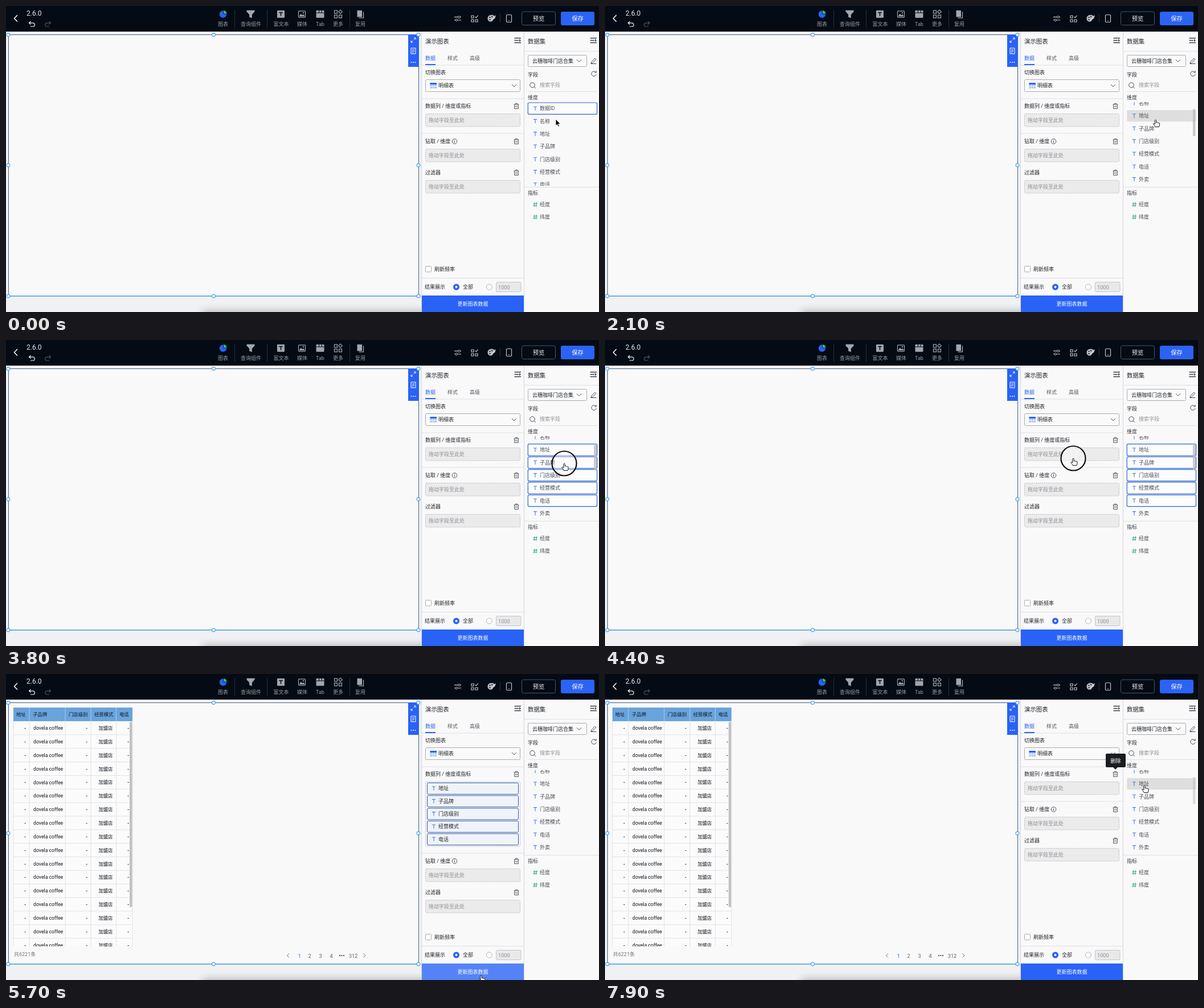
An HTML page that plays this animation: 1041 by 538 pixels, repeating every 8000 ms.

```html
<!DOCTYPE html>
<html lang="zh-CN">
<head>
<meta charset="utf-8">
<title>明细表</title>
<style>
html, body { margin: 0; width: 100%; height: 100%; overflow: hidden; background: #f8f9f9; }
svg { display: block; width: 100%; height: 100%; }
text { font-family: Roboto, "Noto Sans CJK SC", "Noto Sans CJK", sans-serif; white-space: pre; }
</style>
</head>
<body>
<svg id="stage" viewBox="0 0 1041 538"></svg>
<script>
const BLUE = '#2962f6', INK = '#23262b', GREY = '#9a9da3', MUTED = '#8f9296';
const PITCH = 22.33, SCROLL = 31.7, LOOP = 8000;
const fields = ['数据ID', '名称', '地址', '子品牌', '门店级别', '经营模式', '电话', '外卖'];

// Drawing helpers; text is placed by its vertical centre
const text = (x, cy, s, { size = 9, fill = INK, weight = 400, anchor = 'start' } = {}) =>
  `<text x="${x}" y="${cy + size * 0.36}" font-size="${size}" fill="${fill}" font-weight="${weight}" text-anchor="${anchor}">${s}</text>`;
const box = (x1, y1, x2, y2, fill = 'none', extra = '') =>
  `<rect x="${x1}" y="${y1}" width="${x2 - x1}" height="${y2 - y1}" fill="${fill}" ${extra}/>`;
const line = (d, stroke, width = 1, extra = '') =>
  `<path d="${d}" fill="none" stroke="${stroke}" stroke-width="${width}" ${extra}/>`;
const dot = (x, y, r, fill, extra = '') => `<circle cx="${x}" cy="${y}" r="${r}" fill="${fill}" ${extra}/>`;
const group = (body, attrs = '') => `<g ${attrs}>${body}</g>`;
const at = (x, y, body) => group(body, `transform="translate(${x} ${y})"`);
const round = 'stroke-linecap="round" stroke-linejoin="round"';

const rule = (y, x1, x2) => line(`M${x1} ${y}H${x2}`, '#dfe0e2');
const chevron = (x, y) => line(`M${x - 4} ${y - 2}l4 4 4-4`, '#4b4e54');
const typeIcon = (x, y) => line(`M${x - 3} ${y - 3}h6M${x} ${y - 3}v6.8`, '#4a7be8', 1.1);
const hashIcon = (x, y) => line(`M${x - 1} ${y - 4}l-1 8M${x + 2.4} ${y - 4}l-1 8M${x - 3.5} ${y - 1.6}h7.6M${x - 4} ${y + 1.8}h7.6`, '#2fab8e');
const trash = (y) => at(896, y, line('M-4.5 -3h9M-1.7 -3v-1.7h3.4V-3M-3.4 -3v7.5h6.8V-3M-1.2 -.8v3.2M1.2 -.8v3.2', '#565960'));
const menuIcon = (x) => at(x, 60.5, line('M-5.5 -4h11.5M-5.5 0h7.5M-5.5 4h11.5', '#3c3f45', 1.3) + '<path d="M3 -2.5l3 2.5-3 2.5z" fill="#3c3f45"/>');
const dropZone = (y) =>
  box(736.5, y + .5, 902.5, y + 23, '#ebebec', 'stroke="#b9babd" stroke-dasharray="2 1.5" rx="2"') +
  text(742, y + 12, '拖动字段至此处', { fill: '#8b8e93' });

function header() {
  const label = (x, s) => text(x, 31.5, s, { fill: GREY, anchor: 'middle' });
  const icons = [
    at(381, 14.5, dot(0, 0, 6.2, BLUE) + '<path d="M.6 -.6V-7A6.4 6.4 0 0 1 7 -.6z" fill="#28c08c" stroke="#040b14" stroke-width=".8"/>'),
    at(429.5, 14, '<path d="M-7 -6.5H7V-4L2.4 1V7L-2.4 5.5V1L-7 -4z" fill="#a3a6ab"/>'),
    at(482.5, 14.3, box(-6.5, -6.5, 6.5, 6.5, '#a3a6ab', 'rx="1"') + line('M-3.3 -2.8h6.6M0 -2.8v6', '#040b14', 1.6)),
    at(519.5, 14.3, box(-6, -5.5, 6, 5.5, 'none', 'stroke="#a3a6ab" stroke-width="1.2" rx="1"') + '<path d="M-5 4L-2 -.5 1 2 3 .2 5 4z" fill="#a3a6ab"/>' + dot(2.5, -2.4, 1.2, '#a3a6ab')),
    at(551.5, 14.3, box(-7, -6.5, 7, 6.5, '#a3a6ab', 'rx="1"') + line('M-7 -2.3H7M-2 -6.5v4M2.6 -6.5v4', '#040b14', 1.1)),
    at(583, 14.3, line('M-6.5 -6.5h5v5h-5zM-6.5 1.5h5v5h-5zM1.5 1.5h5v5h-5zM4 -7.4l3.3 3.3-3.3 3.3-3.3-3.3z', '#a3a6ab', 1.2)),
    at(622, 14.3, box(-5.5, -6.5, 3, 5, '#a3a6ab') + line('M5.5 -4v10.5h-8', '#a3a6ab', 1.3))
  ].join('');
  const names = [[381, '图表'], [430, '查询组件'], [483, '富文本'], [520, '媒体'], [551.5, 'Tab'], [583, '更多'], [622, '复用']];
  const tools =
    at(793, 22, line('M-6 -2.6H6M-6 2.8H6', '#c3c5c9', 1.1) + dot(2.4, -2.6, 1.8, '#040b14', 'stroke="#c3c5c9"') + dot(-2.4, 2.8, 1.8, '#040b14', 'stroke="#c3c5c9"')) +
    at(822.5, 22, line('M-5.5 -5h4v4h-4zM-5.5 2h4v4h-4zM1.5 2h4v4h-4zM1 -3.3l1.8 2 3.4-4', '#c3c5c9', 1.2)) +
    at(852.5, 22, '<path d="M-7 0C-7 -8 6 -8 6.5 -1L2 2.5C2 7 -7 7 -7 0z" fill="#b7b9bd"/>' + dot(-3, -2, 1.1, '#040b14') + dot(.6, -3.2, 1.1, '#040b14') + dot(-3, 2, 1.1, '#040b14') + line('M7 -5L0 3.5', '#d9dadd', 1.4)) +
    at(883, 22, box(-4.5, -6.5, 4.5, 6.5, 'none', 'stroke="#c3c5c9" stroke-width="1.2" rx="1.2"') + line('M-1 4h2', '#c3c5c9'));
  return box(0, 0, 1041, 45, '#040b14') +
    line('M20 16l-5.5 5.7 5.5 5.7', '#fff', 1.5) +
    text(36, 13, '2.6.0', { size: 12, fill: '#eceef0' }) +
    line('M43.5 27l-3 2.8 3 2.8M41 29.8h6.3a3 3 0 0 1 0 6.2h-4.5', '#f2f3f4', 1.2) +
    line('M75.5 27l3 2.8-3 2.8M78 29.8h-6.3a3 3 0 0 0 0 6.2h4.5', '#4d5259', 1.2) +
    icons + names.map(n => label(...n)).join('') +
    line('M401.5 7v31M458.5 7v31M603.5 7v31M867.5 14v15', '#2b3039') + tools +
    box(905.5, 10, 964.5, 33.5, 'none', 'stroke="#50555d" rx="3"') + box(974, 10, 1033, 34, '#2b63f4', 'rx="3"') +
    text(935, 22, '预览', { size: 10.3, fill: '#f2f3f5', anchor: 'middle' }) +
    text(1003.5, 22, '保存', { size: 10.3, fill: '#fff', anchor: 'middle' });
}

function table() {
  const edges = [13, 41, 104, 149, 193.5, 222], rowH = 23.85, dark = '#10151c';
  const end = { size: 8.4, fill: dark, weight: 500, anchor: 'end' }, start = { size: 8.7, fill: dark };
  const heads = [18, 47, 110, 155, 199].map((x, i) => text(x, 71.3, fields[i + 2], { size: 8.4, fill: dark, weight: 500 })).join('');
  let rows = '', grid = edges.map(x => `M${x} 83V479`).join('');
  for (let i = 0; i < 17; i++) {
    const y = 95 + i * rowH;
    grid += `M13 ${83 + (i + 1) * rowH}H222`;
    rows += text(48, y, 'dovela coffee', start) + text(187.5, y, '加盟店', end) +
      [35, 143, 216].map(x => text(x, y, '-', end)).join('');
  }
  const pages = [[515, '1'], [533, '2'], [552, '3'], [571, '4'], [609.5, '312']];
  return group(box(13, 83, 222, 479, '#fbfbfb') + line(grid, '#e1e2e4') + rows, 'clip-path="url(#tableClip)"') +
    box(13, 59, 222, 83, '#68a3dc') + line('M41 59V83M104 59V83M149 59V83M193.5 59V83', '#a9cbea') + heads +
    box(217, 84, 221.5, 410, '#c1c2c4', 'rx="2"') +
    text(14, 493, '共6221条', { fill: '#74777c' }) +
    pages.map(([x, s], i) => text(x, 495.3, s, { size: 9.3, fill: i ? '#5d6066' : '#2878ee', anchor: 'middle' })).join('') +
    [586, 589.5, 593].map(x => dot(x, 495, 1.2, '#5d6066')).join('') +
    line('M497 491.5l-3.5 3.5 3.5 3.5M627.5 491.5l3.5 3.5-3.5 3.5', '#6d7076');
}

function canvasArea() {
  const handles = [4, 364.5, 724].flatMap(x => [50.5, 280, 510].map(y => [x, y])).filter(([x, y]) => x !== 364.5 || y !== 280);
  return box(0, 45, 730, 538, '#f0f1f2') + box(0, 45, 730, 50, '#f4eff6') +
    group(box(345, 536, 800, 560, '#000', 'opacity=".25" filter="url(#soft)"'), 'clip-path="url(#canvasClip)"') +
    box(4.5, 50.5, 724.5, 510, '#f9f9f9') +
    group(table(), 'id="table"') +
    line('M4.5 510V50.5H724.5V510', '#3f6387') + line('M4 510H725', '#3f9ae6', 1.3) +
    box(706, 50, 724.5, 107, BLUE) +
    at(715, 60, line('M1 -4h3v3M4 -4L.8 -.8M-1 4h-3v-3M-4 4L-.8 .8', '#fff')) +
    at(715, 79, line('M-4 -5h8v10h-8zM-2 -2h4M-2 .5h4M-2 3h2.5', '#fff')) +
    [711.5, 715, 718.5].map(x => dot(x, 99, .9, '#fff')).join('') +
    handles.map(([x, y]) => dot(x, y, 2.9, '#fff', 'stroke="#45a3ea" stroke-width="1.1"')).join('');
}

function chartPanel() {
  const chosen = fields.slice(2, 7).map((name, i) => {
    const y = 201 + i * PITCH;
    return box(739.5, y - 9.6, 899.5, y + 10.4, '#eff3fa', 'stroke="#34599c" rx="2"') + typeIcon(751, y) + text(759, y, name);
  }).join('');
  return box(730, 45, 909, 538, '#f9f9fa') +
    text(736, 62.5, '演示图表', { size: 10.4, weight: 500 }) + menuIcon(898) +
    text(736, 91.5, '数据', { fill: BLUE, weight: 500 }) + text(775, 91.5, '样式', { fill: '#55585e' }) + text(814, 91.5, '高级', { fill: '#55585e' }) +
    rule(104, 730, 909) + box(736, 102, 754, 104, BLUE) + text(736, 117, '切换图表') +
    box(736.5, 129.5, 902.5, 150.5, '#fafafa', 'stroke="#a9abaf" rx="2"') +
    box(744.5, 135, 756, 145, '#a9c2fb') + box(744.5, 135, 756, 138, BLUE) + line('M748.3 138v7M752.2 138v7M744.5 141.5h11.5', '#fff', .8) +
    text(759, 140, '明细表') + chevron(892, 140) + rule(163, 730, 909) +
    text(736, 175.7, '数据列 / 维度或指标') + trash(176) +
    group(dropZone(189), 'id="empty"') +
    group(box(736.5, 189.5, 902.5, 303, '#f7f8fa', 'stroke="#a3b3cf" stroke-dasharray="2 1.5" rx="2"') + chosen, 'id="filled"') +
    group(rule(224, 730, 909) + text(736, 237.7, '钻取 / 维度') +
      dot(787.5, 238, 4.3, 'none', 'stroke="#4b4e54"') + line('M787.5 235.3v1.1M787.5 237.3v3.2', '#4b4e54') + trash(238) + dropZone(251) +
      text(736, 293, '过滤器') + trash(293) + dropZone(306), 'id="lower"') +
    box(736.5, 457.5, 746.5, 467.5, '#fff', 'stroke="#a9abaf" rx="1"') + text(752, 462.5, '刷新频率') +
    rule(478.5, 730, 909) + text(735, 494, '结果展示') +
    dot(790.5, 494, 5.5, BLUE) + dot(790.5, 494, 2, '#fff') + text(802, 494, '全部') +
    dot(848.5, 494, 5, '#fff', 'stroke="#b3b5b9"') +
    box(860.5, 485.5, 904, 502.5, '#e9e9ea', 'stroke="#c4c5c8" rx="2"') + text(864, 494.3, '1000', { size: 9.2, fill: MUTED }) +
    box(730, 509, 909, 538, BLUE, 'id="update"') + text(819.5, 523.7, '更新图表数据', { fill: '#fff', anchor: 'middle' });
}

function dataPanel() {
  const rows = fields.map((name, i) => {
    const y = 180 + i * PITCH;
    return box(916.3, y - 10, 1037.5, y + 10.3, 'none', 'class="row" rx="2" stroke-width="1.2"') + typeIcon(929, y) + text(937, y, name, { fill: '#4a4d53' });
  }).join('');
  return box(909, 45, 1041, 538, '#f9f9fa') + line('M909.5 45V538M729.5 45V538', '#d5d6d9') +
    text(916, 62.5, '数据集', { size: 10.4, weight: 500 }) + menuIcon(1031) + rule(79.5, 910, 1041) +
    box(916.5, 86.5, 1019.5, 106.5, '#fafafa', 'stroke="#a9abaf" rx="2"') + text(924, 96.3, '云穗咖啡门店合集') + chevron(1006, 96.3) +
    at(1031.5, 96, line('M-4 2.5L2.3 -4l2 2L-2 4.2l-2.5.3zM-5 5.5h10', '#4b4e54')) +
    text(916, 120.3, '字段', { weight: 500 }) +
    at(1032, 119, line('M3.6 -2.4A4.3 4.3 0 1 0 4.3 1M4.2 -5v3h-3', '#4b4e54')) +
    dot(924, 139, 4.3, 'none', 'stroke="#4b4e54"') + line('M927.2 142.2l2.6 2.6', '#4b4e54') +
    text(937, 139, '搜索字段', { fill: MUTED }) + rule(150.5, 916, 1038) + text(916, 160.5, '维度', { fill: '#3b3e44' }) +
    group(group(rows, 'id="list"') + '<rect id="bar" x="1032" width="4.5" height="48" rx="2" fill="#bdbdbf"/>', 'clip-path="url(#listClip)"') +
    rule(318.5, 910, 1041) + text(916, 329, '指标', { fill: '#3b3e44' }) +
    ['经度', '纬度'].map((s, i) => hashIcon(929, 349 + i * 22) + text(937, 349 + i * 22, s, { fill: '#4a4d53' })).join('');
}

const tooltip = box(879, 140, 914, 164, '#1a1c20', 'rx="2"') + '<path d="M892 164h8l-4 4z" fill="#1a1c20"/>' +
  text(896.5, 152.2, '删除', { size: 9.2, fill: '#fff', anchor: 'middle' });
const pointer = dot(0, 0, 21.5, 'rgba(255,255,255,.35)', 'id="ring" stroke="#0c0c0c" stroke-width="2.2"') +
  `<path id="arrow" d="M0 0V11.6L2.7 9.1 4.5 13.2 6.4 12.3 4.6 8.4H8.2z" fill="#000" stroke="#fff" stroke-width=".8"/>` +
  `<path id="hand" d="M-1.2 1Q0 -1 1.2 1V5Q2.4 3.8 3.4 5.2 4.6 4.3 5.4 5.8 7.4 5 7.2 7.5 7.2 10 6 12.5H-.8Q-1.6 10.4 -4 7.6C-4.2 6 -2.6 6 -1.2 7.6z" fill="#fff" stroke="#111" ${round}/>`;

const clip = (id, ...r) => `<clipPath id="${id}">${box(...r)}</clipPath>`;
document.getElementById('stage').innerHTML =
  `<defs>${clip('tableClip', 12, 83, 223, 479)}${clip('listClip', 915, 169, 1039, 316)}${clip('canvasClip', 0, 511, 730, 538)}
  <filter id="soft" x="-10%" y="-100%" width="120%" height="300%"><feGaussianBlur stdDeviation="7"/></filter></defs>` +
  canvasArea() + chartPanel() + dataPanel() + header() +
  group(tooltip, 'id="tip"') + group(pointer, 'id="cursor"');

const $ = id => document.getElementById(id);
const show = (id, on) => $(id).setAttribute('visibility', on ? 'visible' : 'hidden');
const rowBoxes = [...document.querySelectorAll('.row')];
const between = (t, a, b) => t >= a && t < b;
const ease = k => k * k * (3 - 2 * k);

// time, x, y of the pointer tip
const path = [
  [0, 965, 199], [1400, 971, 212], [1900, 968, 205], [2300, 965, 195], [2700, 966, 248],
  [3100, 970, 284], [3500, 980, 217], [3800, 980, 217], [4400, 822, 208], [4600, 822, 208], [4900, 834, 530],
  [6100, 834, 530], [6600, 899, 187], [6700, 896, 177], [7400, 896, 177], [7800, 947, 196], [8000, 947, 196]
];
const clicks = [[2300, 2500], [3100, 3300], [3800, 4600], [5200, 5400], [6900, 7100]];
const DRAG = 3800, DROP = 4600, LOADED = 5700, CLEARED = 7000;

function pointerAt(t) {
  const i = path.findIndex(p => p[0] > t);
  const [t0, x0, y0] = path[i - 1], [t1, x1, y1] = path[i];
  const k = ease((t - t0) / (t1 - t0));
  return [x0 + (x1 - x0) * k, y0 + (y1 - y0) * k];
}

function render(t) {
  const [x, y] = pointerAt(t);
  const scrolled = ease(Math.min(1, Math.max(0, (t - 1500) / 500)));
  const scroll = SCROLL * scrolled;
  const filled = between(t, DROP, CLEARED);
  const hand = between(t, 2000, 6200) || t >= 6700;
  const pressed = clicks.some(c => between(t, ...c));

  $('cursor').setAttribute('transform', `translate(${x} ${y})`);
  show('ring', pressed);
  show('hand', hand);
  show('arrow', !hand);

  const overList = x > 916 && y > 169 && y < 316 && t >= 500 && !between(t, DRAG, DROP);
  const hover = overList ? Math.floor((y + scroll - 169.5) / PITCH) : -1;
  const [first, last] = t < 2300 ? [0, 0] : t < 3100 ? [2, 2] : t < DROP ? [2, 6] : [-1, -1];
  rowBoxes.forEach((row, i) => {
    const selected = i >= first && i <= last;
    row.setAttribute('stroke', selected ? '#2d66cf' : 'none');
    row.setAttribute('fill', selected ? '#fcfcfd' : i === hover ? '#dedede' : 'none');
  });
  $('list').setAttribute('transform', `translate(0 ${-scroll})`);
  $('bar').setAttribute('y', 246 - 65 * scrolled);
  $('bar').setAttribute('opacity', t < CLEARED ? .8 : .5);
  show('bar', between(t, 1200, 4700) || t >= 7700);

  show('empty', !filled);
  show('filled', filled);
  $('lower').setAttribute('transform', `translate(0 ${filled ? 91 : 0})`);
  $('update').setAttribute('fill', between(t, 4800, 6700) ? '#5583f7' : BLUE);
  show('table', t >= LOADED);
  show('tip', t >= 6800);
}

function tick() {
  render(Math.floor(performance.now() % LOOP / 100) * 100);
  requestAnimationFrame(tick);
}
tick();
</script>
</body>
</html>
```
